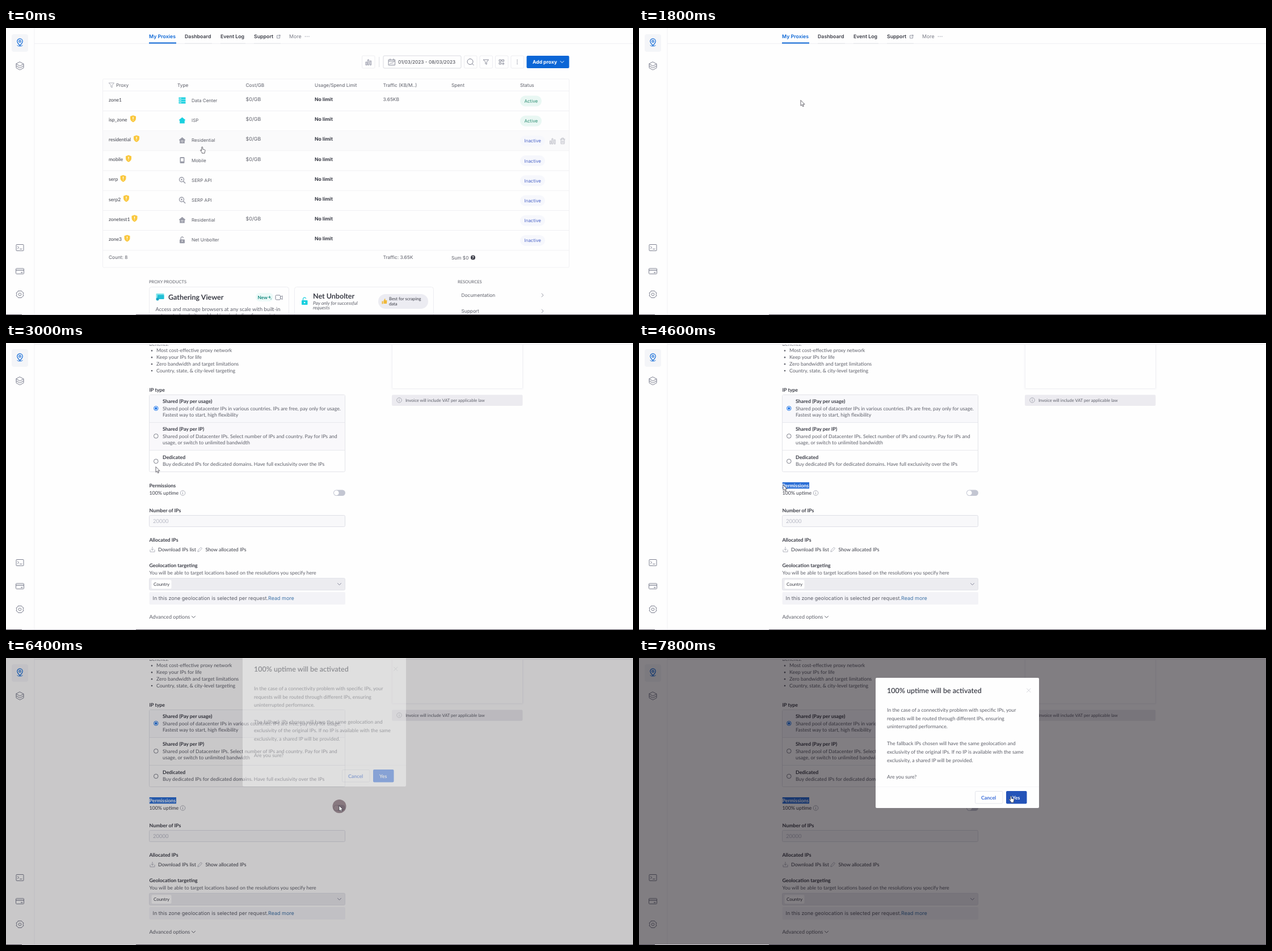
These frames come from a looping animation (1105x507 px, 8 s). An HTML page:

```html
<!DOCTYPE html>
<html lang="en">
<head>
<meta charset="utf-8">
<title>Proxy settings</title>
<style>
html, body { margin: 0; width: 100%; height: 100%; overflow: hidden; background: #fefefe; }
svg { display: block; width: 1105px; height: 507px; font-family: Inter, sans-serif; text-rendering: geometricPrecision; }
.lato { font-family: Lato, sans-serif; }
.b { font-weight: 700; }
.sb { font-weight: 600; }

.anim { animation: 8s step-end -30ms infinite; }
#list { animation-name: list; }
#nav { animation-name: nav; }
#topline { animation-name: topline; }
#form { animation-name: form; }
#hover0 { animation-name: hover0; }
#hover1 { animation-name: hover1; }
#hover2 { animation-name: hover2; }
#tint { animation-name: tint; }
#select { animation-name: select; }
#shade { animation-name: shade; }
#modal { animation-name: modal; }
#press { animation-name: press; }
#pointer { animation-name: pointer; }
#hand { animation-name: hand; }
#arrow { animation-name: arrow; }
#click { animation-name: click; }

@keyframes list { 0% { visibility: visible } 22.5%, 100% { visibility: hidden } }
@keyframes nav { 0% { visibility: visible } 27.5%, 100% { visibility: hidden } }
@keyframes topline { 0% { visibility: hidden } 27.5%, 100% { visibility: visible } }
@keyframes form {
  0% { visibility: hidden; transform: translateY(60px) }
  25% { visibility: visible; transform: translateY(60px) }
  27.5% { visibility: visible; transform: translateY(24px) }
  30% { visibility: visible; transform: translateY(0) }
  32.5% { visibility: visible; transform: translateY(-70px) }
  35% { visibility: visible; transform: translateY(-150px) }
  37.5%, 100% { visibility: visible; transform: translateY(-188px) }
}
@keyframes hover0 { 0% { opacity: 0 } 12.5%, 100% { opacity: 1 } }
@keyframes hover1 { 0% { opacity: 0 } 7.5% { opacity: 1 } 12.5%, 100% { opacity: 0 } }
@keyframes hover2 { 0% { opacity: 1 } 7.5%, 100% { opacity: 0 } }
@keyframes tint { 0% { opacity: 0 } 35% { opacity: 1 } 40%, 100% { opacity: 0 } }
@keyframes select {
  0% { clip-path: inset(0 0 0 100%) }
  47.5% { clip-path: inset(0 0 0 82%) }
  50% { clip-path: inset(0 0 0 55%) }
  52.5% { clip-path: inset(0 0 0 25%) }
  55%, 100% { clip-path: inset(0) }
}
@keyframes shade { 0% { opacity: 0 } 80% { opacity: .21 } 82.5%, 100% { opacity: .5 } }
@keyframes modal {
  0% { opacity: 0; transform: translateY(-38px) }
  80% { opacity: .42; transform: translateY(-38px) }
  82.5%, 100% { opacity: 1; transform: none }
}
@keyframes press { 0% { fill: #2f6fe6 } 92.5%, 100% { fill: #2453b8 } }
@keyframes pointer {
  0% { transform: translate(346px, 210px) }
  2.5% { transform: translate(345px, 207px) }
  5% { transform: translate(340px, 194px) }
  7.5% { transform: translate(325px, 172px) }
  10% { transform: translate(305px, 150px) }
  12.5% { transform: translate(290px, 133px) }
  15% { transform: translate(285px, 128px) }
  30% { transform: translate(286px, 128px) }
  32.5% { transform: translate(282px, 152px) }
  35% { transform: translate(270px, 198px) }
  37.5% { transform: translate(264px, 219px) }
  40% { transform: translate(268px, 234px) }
  42.5% { transform: translate(285px, 247px) }
  45% { transform: translate(301px, 251px) }
  47.5% { transform: translate(292px, 251px) }
  50% { transform: translate(279px, 251px) }
  52.5% { transform: translate(265px, 251px) }
  55% { transform: translate(256px, 251px) }
  57.5% { transform: translate(254px, 251px) }
  62.5% { transform: translate(290px, 254px) }
  65% { transform: translate(400px, 258px) }
  67.5% { transform: translate(540px, 262px) }
  70% { transform: translate(618px, 264px) }
  72.5% { transform: translate(602px, 262px) }
  75% { transform: translate(588px, 261px) }
  77.5% { transform: translate(587px, 261px) }
  82.5% { transform: translate(592px, 260px) }
  85% { transform: translate(618px, 255px) }
  87.5% { transform: translate(646px, 248px) }
  90% { transform: translate(658px, 246px) }
  92.5%, 100% { transform: translate(656px, 244px) }
}
@keyframes hand { 0% { opacity: 1 } 22.5% { opacity: 0 } 75% { opacity: 1 } 80% { opacity: 0 } 90%, 100% { opacity: 1 } }
@keyframes arrow { 0% { opacity: 0 } 22.5% { opacity: 1 } 75% { opacity: 0 } 80% { opacity: 1 } 90%, 100% { opacity: 0 } }
@keyframes click {
  0% { opacity: 0; transform: none }
  17.5% { opacity: .75; transform: scale(.66) }
  20% { opacity: .6; transform: none }
  22.5% { opacity: 0; transform: none }
  77.5% { opacity: .75; transform: scale(.58) }
  80% { opacity: .6; transform: none }
  82.5%, 100% { opacity: 0; transform: none }
}
</style>
</head>
<body>
<svg id="stage" viewBox="0 0 1105 507"></svg>
<script>
const INK = '#3b3d47', SOFT = '#5d5f69', ICON = '#9a9ca8', RULE = '#ededf1', BLUE = '#0b66d6', CYAN = '#19d0df';

const text = (x, y, s, size = 8.3, fill = SOFT, cls = '') =>
  `<text x="${x}" y="${y}" font-size="${size}" fill="${fill}" class="${cls}">${s}</text>`;
const lato = (x, y, s, size = 8.8, fill = SOFT, cls = '') => text(x, y, s, size, fill, 'lato ' + cls);
const head = (x, y, s, size = 8.8) => lato(x, y, s, size, INK, 'b');
const rect = (x, y, w, h, fill, r = 0, stroke = 'none') =>
  `<rect x="${x}" y="${y}" width="${w}" height="${h}" rx="${r}" fill="${fill}" stroke="${stroke}"/>`;
const line = (d, stroke = ICON, w = 1, fill = 'none') =>
  `<path d="${d}" stroke="${stroke}" stroke-width="${w}" fill="${fill}" stroke-linecap="round" stroke-linejoin="round"/>`;
const disc = (x, y, r, fill, stroke = 'none', w = 1) =>
  `<circle cx="${x}" cy="${y}" r="${r}" fill="${fill}" stroke="${stroke}" stroke-width="${w}"/>`;
const at = (x, y, s) => `<g transform="translate(${x} ${y})">${s}</g>`;
const anim = (id, s) => `<g id="${id}" class="anim">${s}</g>`;
const paragraph = (x, y, step, rows) => rows.map((s, i) => lato(x, y + i * step, s)).join('');

const bars = (c = '#b5b6c0') => line('M-4.5 5v-5h2v5zM-1 5v-9h2v9zM3 5v-7h2v7z', c, .9);
const trash = line('M-4-3h8M-3-3v8h6v-8M-1.5-3v-2h3v2M-1 0v3M1 0v3', '#b5b6c0', .9);
const funnel = c => line('M-4.5-4h9l-3.4 4.2v4l-2.2-1.2v-2.8z', c, .9);
const info = (x, y) => disc(x, y, 4.3, 'none', ICON, .8) + line(`M${x} ${y - .4}v2.3M${x} ${y - 2.2}v.1`, ICON, .9);
const chevron = (x, y, c = ICON, r = 3) => line(`M${x - r} ${y - r / 2}l${r} ${r}l${r}${-r}`, c, 1);

const shield = line('M0-6l5 1.8v4c0 3-2 5-5 6.4c-3-1.4-5-3.4-5-6.4v-4z', 'none', 0, '#fac83e') +
  line('M0-2.8v3M0 2.6v.1', '#fff', 1.3);
const home = c => line('M-5.5-1l5.5-4.4 5.5 4.4v1h-1.2v5.4h-8.6V0h-1.2z', 'none', 0, c);
const typeIcon = {
  servers: [-5.5, -1.6, 2.3].map(y => rect(-6, y, 12, 3.2, CYAN) + rect(-5, y + 1.2, 3.5, .8, '#fff')).join(''),
  isp: home(CYAN),
  home: home('#9a9ca8') + line('M-2 1.5a3 3 0 0 1 4 0M0 3v.3', '#fff', .9),
  phone: rect(-4, -5.5, 8, 11, '#9a9ca8', 1.3) + rect(-2.4, -3.6, 4.8, 5.6, '#fff'),
  search: disc(-1, -1, 4, 'none', '#9a9ca8', 1.4) + disc(-1, -1, 1.4, '#9a9ca8') + line('M2.2 2.2l3 3', '#9a9ca8', 1.6),
  lock: rect(-4.5, -1, 9, 6.8, '#9a9ca8', 1) + line('M-2.4-1v-2a2.3 2.3 0 0 1 4.4-1', '#9a9ca8', 1.3) + disc(0, 2.2, 1, '#fff')
};

const sidebar = rect(0, 0, 50, 507, '#fefefe') + rect(49.5, 0, .8, 507, RULE) + rect(10, 11, 29, 31, '#f4f5f8', 4) +
  at(24.5, 25, line('M0 6c-3-3-4.7-5-4.7-7.4a4.7 4.7 0 0 1 9.4 0C4.7 1 3 3 0 6z', BLUE, 1.2) +
    disc(0, -1.4, 1.7, 'none', BLUE, 1.1) + line('M-4.6 5.6c-1 2 10 2 9.2 0', BLUE, 1)) +
  at(24.5, 67, line('M0-7l6.5 3.5L0 0l-6.5-3.5zM-6.5-3.5v7L0 7l6.5-3.5v-7M-6.5 0L0 3.5 6.5 0', '#7d8090', 1)) +
  at(24.5, 388, rect(-6.5, -5.5, 13, 11, 'none', 1, '#7d8090') + line('M-4-2.2l2.2 2-2.2 2M0 2.5h3.5', '#7d8090', 1)) +
  at(24.5, 429.5, rect(-7, -4.7, 14, 9.6, 'none', 1, '#7d8090') + line('M-7-1.7h14M2 2.4h2.5', '#7d8090', 1.2)) +
  at(24.5, 470.5, line('M-3-6h6l1 1.8 2.5 1.6-1 2.6 1 2.6L4 4.2 3 6h-6l-1-1.8-2.5-1.6 1-2.6-1-2.6L-4-4.2z', '#7d8090', 1) +
    disc(0, 0, 2.3, 'none', '#7d8090'));

const nav = rect(50, 0, 1055, 28, '#fefefe') + rect(50, 27.3, 1055, .8, RULE) +
  text(252, 18, 'My Proxies', 8.8, BLUE, 'sb') + rect(252, 25.5, 48, 2, BLUE) +
  [[315, 'Dashboard', 48], [378, 'Event Log', 44], [437, 'Support', 47]].map(([x, s, w]) =>
    text(x, 18, s, 8.8, INK, 'sb') + rect(x, 26.8, w, .7, '#dadbe2')).join('') +
  line('M480 13h-2.5v5h5v-2.5M480.3 15.2l2.7-2.7M481 12.5h2v2', '#7d8090', .8) +
  text(499, 18, 'More', 8.8, '#7a7c87') + [527.5, 530.7, 533.9].map(x => disc(x, 15, .8, ICON)).join('');

const tool = (x, s) => rect(x - 11, 49, 22.5, 22, '#fefefe', 2, RULE) + at(x, 60, s);
const toolbar = tool(638.5, bars('#85879a')) + rect(657.3, 51, .8, 18, '#d9dae0') +
  rect(665, 49, 137, 22, '#fefefe', 2, '#d9dae0') +
  line('M674.5 56h11v9.500h-11zM674.5 58.500h11M677 54.500v2M683 54.500v2M676.500 63.500l2-2 1.500 1 3-2.500', '#7d8090', .9) +
  text(691, 63, '01/03/2023 - 08/03/2023', 8.3, INK) +
  tool(818.5, disc(-.5, -.5, 5, 'none', '#7d8090') + line('M3.2 3.2l2.5 2.500', '#7d8090')) +
  tool(846, funnel('#7d8090')) +
  tool(873.5, line('M-4-4h3v3h-3zM1-4h3v3h-3zM-4 1h3v3h-3zM2.600 1v4M.6 3h4', '#7d8090', .9)) +
  tool(901, [-3.2, 0, 3.2].map(y => disc(0, y, .8, '#7d8090')).join('')) +
  rect(917.5, 49, 75, 22, BLUE, 2) + text(928, 63, 'Add proxy', 8.6, '#fff', 'b') + chevron(980, 60, '#fff');

// name, shield x, icon, type, has cost
const ROWS = [
  ['zone1', 0, 'servers', 'Data Center', 1], ['isp_zone', 224, 'isp', 'ISP', 1],
  ['residential', 230, 'home', 'Residential', 1], ['mobile', 216, 'phone', 'Mobile', 1],
  ['serp', 206.5, 'search', 'SERP API', 0], ['serp2', 212, 'search', 'SERP API', 0],
  ['zonetest1', 226.5, 'home', 'Residential', 1], ['zone3', 213.5, 'lock', 'Net Unbolter', 0]
];
const row = ([name, shieldX, icon, type, cost], i) => {
  const active = i < 2, w = active ? 38 : 44;
  return at(0, 35.2 * i,
    (i < 3 ? anim('hover' + i, rect(171, 111.5, 821, 34.5, '#fafafb') +
      at(919 + w, 129, bars()) + at(937 + w, 129, trash)) : '') +
    rect(171, 146, 821, .8, RULE) + lato(181, 129.5, name, 8.6, INK) +
    (shieldX ? at(shieldX, 125, shield) : '') + at(310.5, 128, typeIcon[icon]) + text(327, 131, type, 8.05) +
    (cost ? text(422.5, 129, '$0/GB', 8.8) : '') + text(544, 129, 'No limit', 8.6, INK, 'b') +
    rect(906, 119.500, w, 19, active ? '#e9f7f3' : '#f6f7fc', 9.500) +
    text(913.5, 132, active ? 'Active' : 'Inactive', 8, active ? '#2f8f74' : '#4d66c8'));
};
const table = rect(170.5, 90, 822, 333, 'none', 2, '#f1f1f4') + rect(171, 110.700, 821, .8, RULE) +
  at(186, 101, funnel('#a5a7b2')) +
  [[194, 'Proxy'], [302, 'Type'], [422.5, 'Cost/GB'], [544, 'Usage/Spend Limit'], [664.5, 'Traffic (KB/M..)'],
    [785, 'Spent'], [906, 'Status']].map(([x, s]) => text(x, 103.5, s)).join('') +
  ROWS.map(row).join('') + text(664.5, 129, '3.65KB', 8.4) +
  text(181, 408, 'Count: 8') + text(664.5, 408, 'Traffic: 3.65K') + text(785, 408.5, 'Sum $0') +
  disc(823, 405.5, 4, INK) + text(820.9, 408, '?', 7, '#fff', 'b');

const products = lato(252, 451, 'PROXY PRODUCTS', 7.5) + lato(796, 451, 'RESOURCES', 7.5) +
  rect(252.5, 457.5, 246, 60, '#fefefe', 4, RULE) + rect(508.5, 457.5, 245, 60, '#fefefe', 4, RULE) +
  rect(264.5, 469, 14, 10, '#7fe3ea', 1) + rect(267, 471.5, 11.5, 7.5, '#22bfd6', 1) + disc(267, 479, 2.5, '#16a5c4') +
  head(286, 480, 'Gathering Viewer', 12.5) + rect(440, 468, 31, 15, '#ecfaf8', 7) +
  lato(443.5, 479, 'New', 8.3, '#12877c', 'b') + line('M464.500 473.500v4M462.500 475.500h4M467 478v1', '#12877c', .9) +
  rect(475, 472, 8.5, 8, 'none', 1.5, '#7d8090') + line('M483.500 475l3.500-2v6.500l-3.500-2', '#7d8090', .9) +
  lato(263.5, 499.5, 'Access and manage browsers at any scale with built-in', 9.3) +
  lato(263.5, 510.5, 'automated website unblocking, including fingerprint', 9.3) +
  rect(521, 481, 10.5, 8, CYAN, 1) + line('M523.500 481v-2.500a2.700 2.700 0 0 1 5-1', CYAN, 1.3) + disc(526.2, 485, 1.2, '#fff') +
  head(541, 478, 'Net Unbolter', 12.5) +
  '<g font-style="italic">' + lato(541, 489, 'Pay only for successful', 8.5) + lato(541, 496.5, 'requests', 8.5) + '</g>' +
  rect(656, 470, 88, 26, '#ececf2', 13) +
  line('M662.500 482.500h2v5h-2zM665.500 482l2-4 1 .500v2.500h3l-.500 6h-5.500z', 'none', 0, '#f0b93a') +
  lato(675, 481, 'Best for scraping', 7.7, INK) + lato(675, 490, 'data', 7.7, INK) +
  text(802.5, 475, 'Documentation', 8.3) + text(802.5, 503, 'Support', 8.3) +
  [472, 500].map(y => line(`M944 ${y - 3}l3 3l-3 3`)).join('');

const option = (y, title, rows, on) =>
  disc(264.3, y + (rows.length > 1 ? 24.4 : 19.4), 3.8, '#fff', on ? '#1a73e8' : '#7b7d88', 1) +
  (on ? disc(264.3, y + 24.4, 2.2, '#1a73e8') : '') +
  head(276, y + 15.3, title) + paragraph(276, y + 27.5, 11.9, rows);
const form = rect(752, 30, 28.5, 13.5, BLUE, 6.7) + disc(773.5, 36.7, 5.3, '#fff') +
  head(252.5, 77.6, 'Proxy type') + rect(252.5, 82.5, 345, 45, '#fefefe', 2, RULE) +
  at(271.5, 103.5, `<g transform="scale(1.45)">${typeIcon.servers}</g>`) +
  head(290, 101, 'Datacenter Proxies') + lato(290, 115.5, 'Both static and rotating datacenter IPs.') +
  chevron(583, 104, '#c5c6ce', 1.5) +
  paragraph(252.5, 145.2, 11.8, [
    'Our unstoppable Datacenter Proxy network is made up of over 1.6 million IPs with the',
    'largest geographical coverage in the industry. The shorter journey &amp; simplified',
    'architecture makes Datacenter IPs the fastest and most cost-effective.']) +
  lato(252.5, 192.5, 'Benefits:') +
  paragraph(265, 204.4, 11.8, ['Most cost-effective proxy network', 'Keep your IPs for life',
    'Zero bandwidth and target limitations', 'Country, state, &amp; city-level targeting']) +
  [0, 1, 2, 3].map(i => disc(257, 201.600 + i * 11.8, 1.3, SOFT)).join('') +
  head(252.5, 274, 'IP type') + rect(252.5, 279.5, 345, 136, '#fefefe', 2, '#e3e4e9') +
  rect(253, 280, 344, 48.5, '#f8f8fb') + `<g id="tint" class="anim">${rect(253, 329, 344, 48, '#f9f8fb')}</g>` +
  rect(253, 328, 344, .8, '#e3e4e9') + rect(253, 377, 344, .8, '#e3e4e9') +
  option(279, 'Shared (Pay per usage)', [
    'Shared pool of datacenter IPs in various countries. IPs are free, pay only for usage.',
    'Fastest way to start, high flexibility'], true) +
  option(328, 'Shared (Pay per IP)', [
    'Shared pool of Datacenter IPs. Select number of IPs and country. Pay for IPs and',
    'usage, or switch to unlimited bandwidth']) +
  option(377.5, 'Dedicated', ['Buy dedicated IPs for dedicated domains. Have full exclusivity over the IPs']) +
  head(252.5, 442.7, 'Permissions') +
  anim('select', rect(252.5, 434, 47.5, 11.5, '#2b6fd6') + lato(252.5, 442.7, 'Permissions', 8.8, '#fff', 'b')) +
  lato(252.5, 455.8, '100% uptime', 8.8, INK) + info(311.5, 453) +
  rect(577, 447.5, 21, 10.5, '#c3c6d2', 5.2) + disc(582.3, 452.7, 4.3, '#fff') +
  head(252.5, 486.6, 'Number of IPs') + rect(252.5, 492.5, 345, 20, '#f8f8fa', 2, '#dedfe6') +
  lato(259, 506, '20000', 9.5, '#b9bbc6') +
  head(252.5, 538.600, 'Allocated IPs') + line('M254 553.500v3.500h8v-3.500M258 548.500v5.500M256 552l2 2 2-2', '#a9abb6', .9) +
  lato(268, 556, 'Download IPs list', 8.8, INK) + line('M338 556.500l.8-2.800 4.700-4.700 2 2-4.700 4.700z', '#a9abb6', .9) +
  lato(351.5, 556, 'Show allocated IPs', 8.8, INK) +
  head(252.5, 583.5, 'Geolocation targeting') +
  lato(252.5, 597, 'You will be able to target locations based on the resolutions you specify here') +
  rect(252.5, 603.5, 345, 21, '#ececf0', 2, '#e2e3e9') + rect(256.5, 606.500, 35, 15.500, '#fff', 2) +
  lato(260, 617, 'Country', 7.9, INK) + chevron(587.5, 614, '#85879a') +
  rect(252.5, 628, 345.5, 22, '#f3f3f7', 2) + text(258.5, 642, 'In this zone geolocation is selected per request.', 9) +
  text(462, 642, 'Read more', 9, '#3f74a8') +
  lato(252.5, 675, 'Advanced options', 9.1) + chevron(330.5, 672, SOFT) +
  head(680, 82.5, 'Estimated cost', 13.7) +
  rect(678, 98, 235, 173, '#fafafb', 4) + rect(680.5, 98.5, 230, 170, '#fefefe', 2, '#f1f1f4') +
  rect(680, 279.5, 230.5, 19.5, '#ecebf0', 2) + info(693, 289) +
  lato(704, 291.7, 'Invoice will include VAT per applicable law', 7.6);

const modal = rect(417, 35, 288, 230, '#fefefe', 2) + lato(437, 61.5, '100% uptime will be activated', 12.5, INK, 'sb') +
  line('M683.500 54l6.500 6.500M690 54l-6.500 6.500', '#d5d6dc') +
  paragraph(437, 94.8, 14.8, ['In the case of a connectivity problem with specific IPs, your',
    'requests will be routed through different IPs, ensuring', 'uninterrupted performance.', '',
    'The fallback IPs chosen will have the same geolocation and',
    'exclusivity of the original IPs. If no IP is available with the same',
    'exclusivity, a shared IP will be provided.', '', 'Are you sure?']) +
  rect(417, 227, 288, .8, '#f3f3f5') + rect(592.5, 235.5, 48.500, 21.500, '#fefefe', 2, '#e3e5ec') +
  lato(603, 249.5, 'Cancel', 8.8, '#3a6cd8', 'b') +
  '<rect id="press" class="anim" x="647" y="235" width="36.500" height="22.500" rx="2"/>' +
  lato(658, 249.5, 'Yes', 8.8, '#fff', 'b');

const pointer = anim('click', disc(.5, 1, 12, '#5d4650')) +
  anim('arrow', line('M0 0v9.300l2.200-1.900 1.500 3.400 1.600-.7-1.500-3.300h2.900z', '#45434c', .8, '#fff')) +
  anim('hand', line('M-1.300 6.500V1a1 1 0 0 1 2 0v3.200l3.400.8c.8.200 1 .8.900 1.500l-.8 3.300v1.400h-4.800v-1.200l-2.700-3.500c-.6-1 .6-1.500 1.200-.9z', '#45434c', .8, '#fff'));

document.getElementById('stage').innerHTML =
  `<clipPath id="view">${rect(50, 3, 1055, 504, '#000')}</clipPath>` +
  rect(0, 0, 1105, 507, '#fefefe') +
  anim('list', toolbar + table + products) +
  `<g clip-path="url(#view)">${anim('form', form)}</g>` +
  anim('topline', rect(50, 2.300, 1055, .8, '#e6e6eb')) + anim('nav', nav) + sidebar +
  `<rect id="shade" class="anim" width="1105" height="507" fill="#060008"/>` +
  rect(0, 506, 1105, 1, '#57525f') + rect(28, 506, 201, 1, '#cfccd4') +
  anim('modal', modal) + anim('pointer', pointer);
</script>
</body>
</html>
```
